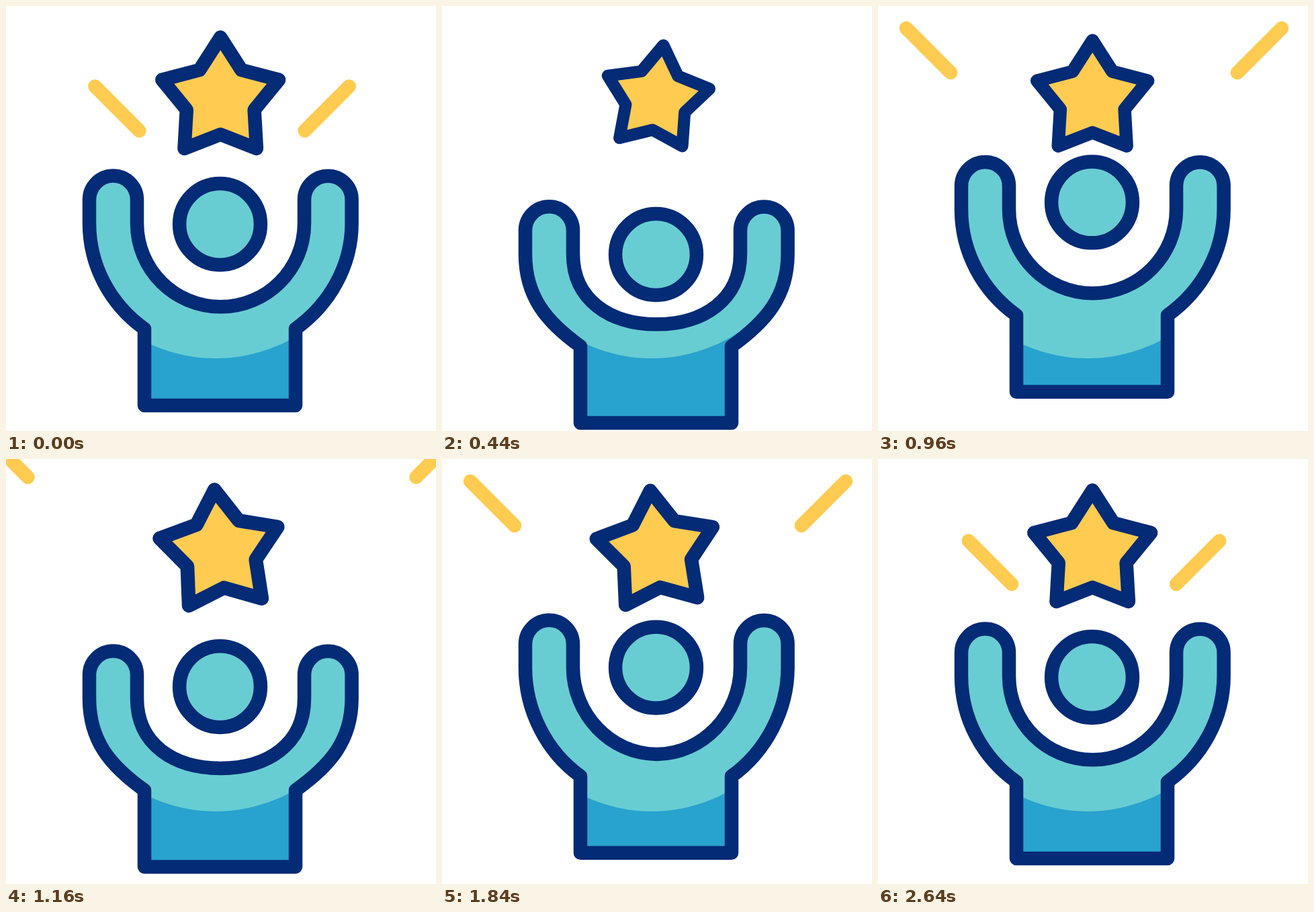
Write an HTML page with a canvas that moves like this. It is 640 px wide and 632 px high and loops after 2680 ms.

```html
<!DOCTYPE html>
<html lang="en">
<head>
<meta charset="utf-8">
<title>Cheering figure</title>
<style>
  html, body { margin: 0; width: 100%; height: 100%; overflow: hidden; background: #fff; }
  canvas { display: block; }
</style>
</head>
<body>
<canvas id="stage" width="640" height="632"></canvas>
<script>
const ctx = document.getElementById('stage').getContext('2d');
const LOOP = 2680, BEAT = 400;
const NAVY = '#032b76', TEAL = '#68cdd2', BLUE = '#28a2ce', GOLD = '#ffcb50';

const clamp = u => Math.min(1, Math.max(0, u));
const progress = (t, from, to) => clamp((t - from) / (to - from));

// Smooth motion through one value per beat; the last segment may have its own length.
function keyed(t, values, delay = 0, lastBeat = BEAT) {
  const last = values.length - 2;
  const i = Math.min(last, Math.max(0, Math.floor((t - delay) / BEAT)));
  const u = clamp((t - delay - i * BEAT) / (i === last ? lastBeat : BEAT));
  return values[i] + (values[i + 1] - values[i]) * u * u * (3 - 2 * u);
}

function bodyPath(torso, arm) {
  const top = 288 + arm, elbow = 323 + arm, neck = 447.3 + torso, waist = 480 + torso, base = 594 + torso;
  const p = new Path2D();
  p.moveTo(206, waist);
  p.bezierCurveTo(155, waist - 36.5, 124, elbow + 63, 124, elbow);
  p.lineTo(124, top);
  p.arc(159.5, top, 35.5, Math.PI, 0);
  p.lineTo(195, elbow);
  p.bezierCurveTo(195, elbow + 68.8, 250.7, neck, 319.5, neck);
  p.bezierCurveTo(388.2, neck, 444, elbow + 68.8, 444, elbow);
  p.lineTo(444, top);
  p.arc(479.3, top, 35.3, Math.PI, 0);
  p.lineTo(514.6, elbow);
  p.bezierCurveTo(514.6, elbow + 63, 482, waist - 36.5, 431, waist);
  p.lineTo(431, base);
  p.lineTo(206, base);
  p.closePath();
  return p;
}

function outline(path) {
  ctx.strokeStyle = NAVY;
  ctx.lineWidth = 20.5;
  ctx.stroke(path);
}

function drawBody(t) {
  const path = bodyPath(keyed(t, [0, 28, -39, 14, -24, 0]), keyed(t, [0, 48.8, -51.3, 35.4, -36.5, 0]));
  ctx.save();
  ctx.clip(path);
  ctx.fillStyle = BLUE;
  ctx.fillRect(0, 0, 640, 632);
  ctx.fillStyle = TEAL;
  ctx.beginPath();
  ctx.arc(312, 289, 235, 0, 2 * Math.PI);
  ctx.fill();
  ctx.restore();
  outline(path);
}

function drawHead(t) {
  const path = new Path2D();
  path.arc(318.5, 324.5 + keyed(t, [0, 45, -47.6, 21, -29, 0], 40), 60.4, 0, 2 * Math.PI);
  ctx.fillStyle = TEAL;
  ctx.fill(path);
  outline(path);
}

function drawStar(t) {
  const scale = keyed(t, [1, 0.877, 0.911, 1.018, 0.884, 1.063, 1], 0, 440);
  const angle = keyed(t, [0, 7.5, 3.2, -5.8, 7.6, -13, 0], 0, 440);
  const path = new Path2D();
  for (let i = 0; i < 10; i++) {
    const r = i % 2 ? 53 : 91.4, a = i * Math.PI / 5;
    path.lineTo(r * Math.sin(a), -r * Math.cos(a));
  }
  path.closePath();
  ctx.save();
  ctx.translate(319.2, 138);
  ctx.rotate(angle * Math.PI / 180);
  ctx.scale(scale, scale);
  ctx.fillStyle = GOLD;
  ctx.fill(path);
  outline(path);
  ctx.restore();
}

// Each ray grows outwards from its inner end, then flies off the stage.
function drawRays(t) {
  let length = 66, shift = 0;
  if (t < 480) {
    shift = 260 * progress(t, 0, 400);
  } else if (t < 2280) {
    const start = t < 1400 ? 720 : 1600;
    length *= progress(t, start - 157, start + 145);
    shift = 0.3775 * Math.max(0, t - start);
  } else {
    length *= progress(t, 2320, 2650);
  }
  if (length <= 0) return;
  ctx.strokeStyle = GOLD;
  ctx.lineWidth = 20.5;
  for (const [x, side] of [[199, -1], [444, 1]]) {
    const x0 = x + side * shift, y0 = 186 - 0.955 * shift;
    ctx.beginPath();
    ctx.moveTo(x0, y0);
    ctx.lineTo(x0 + side * length, y0 - length);
    ctx.stroke();
  }
}

function frame() {
  const t = performance.now() % LOOP;
  ctx.fillStyle = '#fff';
  ctx.fillRect(0, 0, 640, 632);
  ctx.lineCap = ctx.lineJoin = 'round';
  drawRays(t);
  drawBody(t);
  drawStar(t);
  drawHead(t);
  requestAnimationFrame(frame);
}
frame();
</script>
</body>
</html>
```
